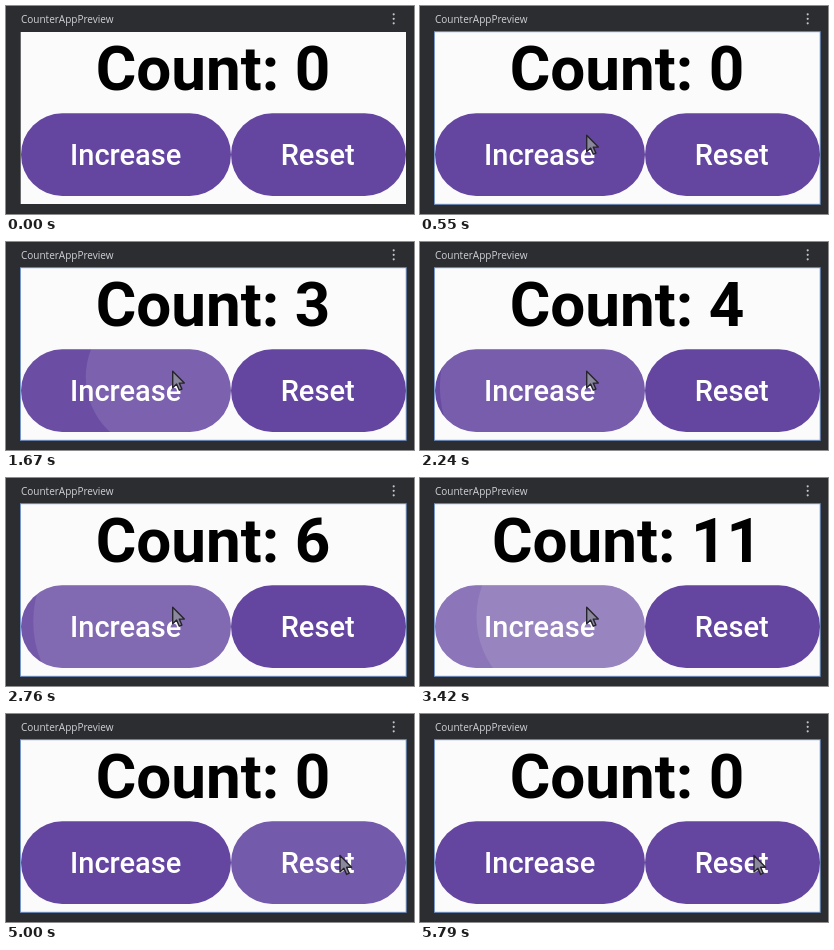
An HTML page for the animation above (5850 ms loop, 408 px wide and 208 px high).

```html
<!DOCTYPE html>
<html lang="en">
<head>
<meta charset="utf-8">
<title>Counter preview</title>
<style>
  html, body { margin: 0; width: 100%; height: 100%; overflow: hidden; background: #2b2d31; }
  svg { display: block; width: 408px; height: 208px; }
  text { font-family: Roboto, sans-serif; text-anchor: middle; }
  .soft { filter: blur(0.4px); }
  .title { font: 10px "Open Sans", sans-serif; fill: #cfd1d6; text-anchor: start; }
  .count { font-size: 62px; font-weight: 700; fill: #000; }
  .label { font-size: 29px; font-weight: 500; fill: #fff; }
  .button { fill: #6446a0; }
</style>
</head>
<body>
<svg viewBox="0 0 408 208">
  <defs>
    <clipPath id="clipIncrease"><rect x="15" y="107.3" width="210" height="82.6" rx="41.3"/></clipPath>
    <clipPath id="clipReset"><rect x="225" y="107.3" width="175" height="82.6" rx="41.3"/></clipPath>
  </defs>
  <rect width="408" height="208" fill="#2b2d31"/>
  <text class="title" x="15" y="17">CounterAppPreview</text>
  <g fill="#c3c5ca">
    <circle cx="387.7" cy="8.3" r="1.1"/>
    <circle cx="387.7" cy="12.8" r="1.1"/>
    <circle cx="387.7" cy="17.3" r="1.1"/>
  </g>
  <g class="soft">
    <rect x="14.7" y="26" width="385.3" height="172" fill="#fbfbfc"/>
    <rect id="focus" x="14.5" y="25.7" width="385.7" height="172.6" fill="none" stroke="#7898cb"/>
    <text class="count" id="count" x="207" y="84.3">Count: 0</text>
    <rect class="button" x="15" y="107.3" width="210" height="82.6" rx="41.3"/>
    <rect class="button" x="225" y="107.3" width="175" height="82.6" rx="41.3"/>
    <g id="increase" clip-path="url(#clipIncrease)" fill="#fff"></g>
    <g id="reset" clip-path="url(#clipReset)" fill="#fff"></g>
    <text class="label" x="119.7" y="158.8">Increase</text>
    <text class="label" x="311.7" y="158.8">Reset</text>
    <path id="cursor" d="M0 0V16.5L3.9 12.9L6.6 19L9.2 17.8L6.6 11.9H11.6Z"
          fill="#8b879c" stroke="#26242e" stroke-width="1.4" stroke-linejoin="round"/>
  </g>
</svg>
<script>
const LOOP = 5850;
const PRESSES = [760, 1090, 1592, 2000, 2340, 2540, 2770, 2890, 3020, 3150, 3279, 3450];
const RESET = 4740;
const RELEASE = 65;
const SHOW = 120;
const INCREASE = { id: "increase", from: [167, 130], center: [120, 148.5], r0: 58, r1: 122 };
const RESET_BTN = { id: "reset", from: [335, 142], center: [312, 148.5], r0: 50, r1: 106 };

const $ = id => document.getElementById(id);
const clamp = v => Math.max(0, Math.min(1, v));
const mix = (a, b, k) => a + (b - a) * k;
const ease = k => k * k * (3 - 2 * k);

function addRipple(button, start) {
  const node = document.createElementNS("http://www.w3.org/2000/svg", "circle");
  $(button.id).append(node);
  return { button, start, node };
}

const ripples = PRESSES.map(t => addRipple(INCREASE, t));
ripples.push(addRipple(RESET_BTN, RESET));

// A ripple spreads towards the button's centre, holds, then fades.
function drawRipple({ button, start, node }, t) {
  const age = t - start;
  const grow = clamp(age / 300);
  const alpha = 0.107 * clamp(age / 50) * (1 - clamp((age - 400) / 300));
  node.setAttribute("cx", mix(button.from[0], button.center[0], grow));
  node.setAttribute("cy", mix(button.from[1], button.center[1], grow));
  node.setAttribute("r", mix(button.r0, button.r1, grow));
  node.setAttribute("fill-opacity", alpha);
}

function cursorAt(t) {
  const arrive = ease(clamp((t - SHOW) / 400));
  const move = ease(clamp((t - 3850) / 400));
  return [
    mix(mix(225, 166.7, arrive), 334, move),
    mix(mix(168, 129.2, arrive), 141.4, move)
  ];
}

function draw(t) {
  const value = t >= RESET + RELEASE ? 0 : PRESSES.filter(p => t >= p + RELEASE).length;
  const label = "Count: " + value;
  if ($("count").textContent !== label) $("count").textContent = label;
  ripples.forEach(r => drawRipple(r, t));
  const shown = t >= SHOW ? "visible" : "hidden";
  $("focus").setAttribute("visibility", shown);
  $("cursor").setAttribute("visibility", shown);
  $("cursor").setAttribute("transform", `translate(${cursorAt(t)})`);
}

const begin = performance.now();
function tick() {
  draw((performance.now() - begin) % LOOP);
  requestAnimationFrame(tick);
}
draw(0);
requestAnimationFrame(tick);
</script>
</body>
</html>
```
